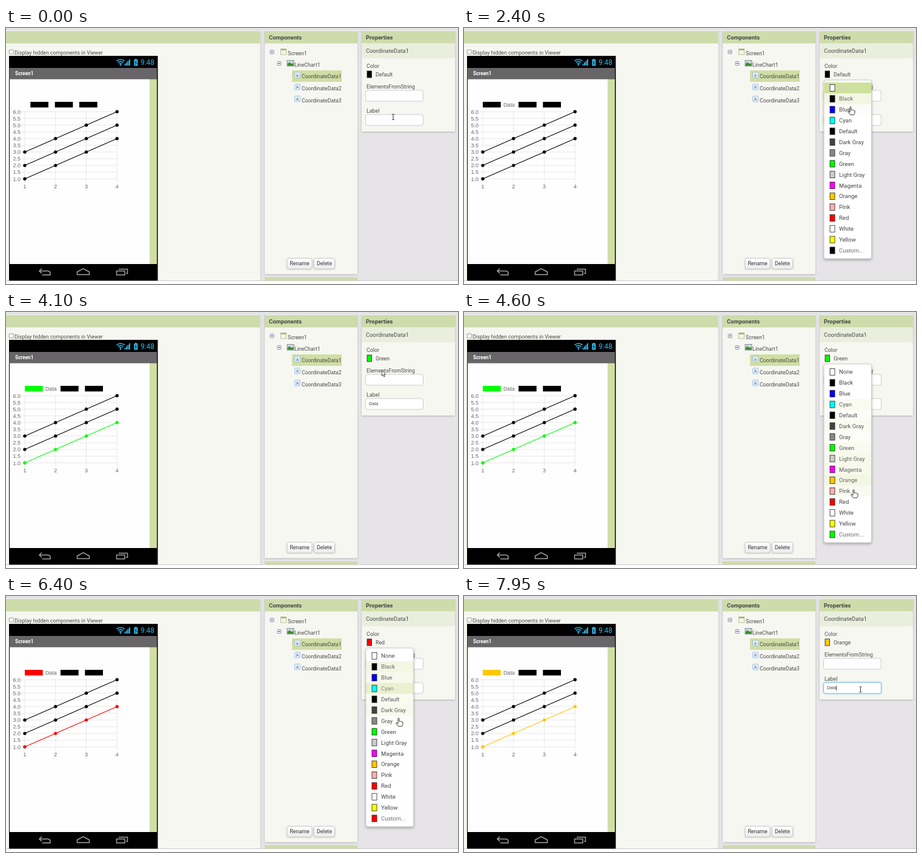
Write an HTML page that moves like this. It is 746 px wide and 423 px high and loops after 8 s.

```html
<!DOCTYPE html>
<html>
<head>
<meta charset="utf-8">
<style>
html, body { margin: 0; width: 100%; height: 100%; overflow: hidden; background: #fdfdfd; }
svg { display: block; width: 746px; height: 423px; font-family: Roboto, sans-serif; }
.chart { font-family: "Liberation Sans", Arial, sans-serif; }
</style>
</head>
<body>
<svg viewBox="0 0 746 423">
  <defs>
    <filter id="soft" x="-10%" y="-10%" width="120%" height="120%"><feDropShadow dx="0" dy="1" stdDeviation="1.5" flood-opacity=".22"/></filter>
    <filter id="lift" x="-10%" y="-5%" width="120%" height="110%"><feDropShadow dx="0" dy="2" stdDeviation="2" flood-opacity=".3"/></filter>
    <filter id="glow" x="-10%" y="-30%" width="120%" height="160%"><feDropShadow dx="0" dy="0" stdDeviation="1.8" flood-color="#52a8ec" flood-opacity=".7"/></filter>
    <linearGradient id="btn" x2="0" y2="1"><stop stop-color="#fff"/><stop offset="1" stop-color="#ececec"/></linearGradient>
  </defs>
  <g id="base"></g>
  <g id="live"></g>
</svg>
<script>
const LOOP = 8000, GREEN_BAR = '#cddcaa', PANEL = '#f6f7f1';
const rect = (x, y, w, h, fill, more = '') =>
  `<rect x="${x}" y="${y}" width="${w}" height="${h}" fill="${fill}" ${more}/>`;
const path = (d, stroke, width = 1, fill = 'none') =>
  `<path d="${d}" stroke="${stroke}" stroke-width="${width}" fill="${fill}"/>`;
const text = (x, mid, s, size = 8.75, fill = '#4a4a4a', more = '') =>
  `<text x="${x}" y="${mid + size * .36}" font-size="${size}" fill="${fill}" ${more}>${s}</text>`;
const bold = 'font-weight="700"';
const mix = (a, b, k) => `rgb(${a.map((v, i) => Math.round(v + (b[i] - v) * k))})`;

// Chart geometry
const px = v => 31 + (v - 1) * 50.75;
const py = v => 249.3 - (v - 1) * 22.2;
const series = (first, color) => {
  let s = path(`M${px(1)} ${py(first)}L${px(4)} ${py(first + 3)}`, color, 1.1);
  for (let i = 0; i < 4; i++) s += `<circle cx="${px(1 + i)}" cy="${py(first + i)}" r="2.7" fill="${color}"/>`;
  return s;
};

function input(y, value, focus) {
  return rect(593.5, y, 95, 18, '#fff', `rx="3" stroke="${focus ? '#7cbdee' : '#ccc'}" ${focus ? 'filter="url(#glow)"' : ''}`) +
    text(599, y + 8.7, value, 7.2, '#444', 'class="chart"');
}

function button(x, w, label) {
  return rect(x, 380.5, w, 17.5, 'url(#btn)', 'rx="3" stroke="#ccc" filter="url(#soft)"') +
    text(x + w / 2, 389, label, 8.8, '#333', 'text-anchor="middle"');
}

function phone() {
  let s = rect(5, 46, 245.5, 371.5, '#000') + rect(5.5, 66, 243.5, 18.5, '#676567') +
    rect(6, 84.5, 231, 305.5, '#fefefe') + rect(237, 84.5, 12, 305.5, '#d0dea5') +
    text(15, 75.3, 'Screen1', 8.2, '#fff', bold) + text(222, 57, '9:48', 11.9, '#33b5e5');
  s += path('M182.5 54.5Q189 49.5 195.5 54.5M184.8 57Q189 53.6 193.200 57M187 59.300Q189 57.800 191 59.300', '#33b5e5', 1.7);
  s += '<circle cx="189" cy="61.2" r="1.2" fill="#33b5e5"/>';
  for (let i = 0; i < 4; i++) s += rect(195.5 + i * 2.5, 59.5 - i * 2.6, 1.9, 2.5 + i * 2.6, '#33b5e5');
  s += rect(211.3, 52, 6, 10.5, '#33b5e5') + rect(213, 51, 2.6, 1.5, '#33b5e5') +
    path('M215 53.500L213 57.500H215.500L213.500 61', '#000', .8);
  s += path('M59 397.500L55 401.500L59 405.500M55 401.500H69Q73 402 73 405V408H60', '#a2a2a2', 1.5);
  s += path('M117.500 403L127.500 397.500L137.500 403V407.500H117.500Z', '#a2a2a2', 1.5);
  s += path('M182.500 401.500H196V408H182.500ZM186 398.500H200.500V405.500H198', '#a2a2a2', 1.5);
  return s;
}

function chartBase() {
  let s = '';
  for (let v = 1; v <= 6; v += .5) {
    s += path(`M26 ${py(v)}H${px(4)}`, '#e3e3e3', .8) +
      text(24, py(v), v.toFixed(1), 9, '#666', 'text-anchor="end" class="chart"');
  }
  for (let v = 1; v <= 4; v++) {
    s += path(`M${px(v)} ${py(6)}V254.500`, '#e3e3e3', .8) +
      text(px(v), 261.3, v, 9, '#666', 'text-anchor="middle" class="chart"');
  }
  return s + series(3, '#000') + series(2, '#000');
}

function tree() {
  let s = rect(472, 70, 82, 19, '#d0dea5');
  for (const [x, y] of [[436, 36.5], [448, 55.5]])
    s += rect(x, y, 6, 6, '#fff', 'rx="1" stroke="#8585b5"') + path(`M${x + 1.3} ${y + 3}h3.400`, '#333');
  s += rect(453.5, 34.5, 9, 9.5, '#f4f6e4', 'stroke="#a9b08b" stroke-width=".8"') + rect(453.5, 34.5, 9, 2.5, '#a9bd70');
  s += rect(464, 53.5, 11, 9.5, '#c5dcec', 'stroke="#666" stroke-width=".7"') +
    path('M464.500 62.500V59L468 56.500L471 59L474.500 58V62.500Z', 'none', 0, '#3d8d31') + '<circle cx="472" cy="56" r="1.1" fill="#f2d647"/>';
  s += text(465, 41.5, 'Screen1') + text(476, 60.8, 'LineChart1');
  for (let i = 0; i < 3; i++) {
    const y = 73 + i * 19.7;
    s += rect(476.5, y, 9, 9.5, '#e3eefb', 'rx="1" stroke="#9db7d6" stroke-width=".8"') +
      text(481, y + 4.9, 'A', 7.5, '#4674b8', 'text-anchor="middle"') +
      text(488, y + 7.3, 'CoordinateData' + (i + 1));
  }
  return s;
}

const panel = (x, y, w, h) => rect(x, y, w, h, PANEL, 'filter="url(#soft)"');

document.getElementById('base').innerHTML =
  rect(0, 0, 746, 418, '#e6e4e7') +
  panel(-5, 4, 424.500, 413.5) + rect(0, 5, 419.5, 20.5, GREEN_BAR) +
  panel(427, 4, 153, 402.5) + rect(427, 5, 153, 20.5, GREEN_BAR) +
  panel(587, 4, 154, 167) + rect(587, 5, 154, 20.5, GREEN_BAR) + rect(587, 25.5, 154, 24.5, '#eaeedd') +
  rect(427, 412, 153, 5.5, GREEN_BAR) +
  rect(0, 418, 746, 5, '#fdfdfd') + rect(0, 417, 746, 1, '#cbcbcb') +
  text(434, 15.3, 'Components', 9.45, '#444', bold) + text(594, 15.3, 'Properties', 9.45, '#444', bold) +
  text(594, 38, 'CoordinateData1', 9.45) +
  text(595, 63, 'Color', 8.8) + text(595, 97, 'ElementsFromString', 8.8) + text(595, 137, 'Label', 8.8) +
  rect(5.3, 36, 7, 7, '#fff', 'rx="1" stroke="#8a8a8a" stroke-width=".9"') +
  text(14, 41.3, 'Display hidden components in Viewer', 8.78) +
  button(464, 41, 'Rename') + button(508.5, 34, 'Delete') +
  phone() + chartBase() + tree();

const COLORS = {
  None: '#fff', Black: '#000', Blue: '#00f', Cyan: '#0ff', Default: '#000', 'Dark Gray': '#444', Gray: '#888',
  Green: '#0f0', 'Light Gray': '#ccc', Magenta: '#f0f', Orange: '#ffc800', Pink: '#ffafaf', Red: '#f00',
  White: '#fff', Yellow: '#ff0', 'Custom...': ''
};
const names = Object.keys(COLORS), ROW = 17.9, TOP = 90;

// Colour picks: start time, name, rgb
const PICKS = [[-2000, 'Default', [0, 0, 0]], [3050, 'Green', [0, 255, 0]], [5050, 'Red', [255, 0, 0]], [7050, 'Orange', [255, 200, 0]]];
const MENUS = [[2050, 3050], [4300, 5050], [6150, 7050]];
const TYPED = [450, 550, 700, 800];

// Pointer track: time, x, y
const TRACK = [
  [0, 639, 147], [200, 639, 147], [350, 642, 151], [1600, 642, 146], [1750, 630, 90], [1900, 622, 80], [2100, 622, 79],
  [2200, 628, 96], [2350, 634, 103], [2400, 638, 130], [2560, 644, 215], [2700, 648, 246], [2850, 646, 227], [3050, 646, 227],
  [3300, 654, 227], [3600, 653, 226], [3850, 642, 190], [4150, 616, 78], [4300, 616, 78], [4380, 624, 110], [4480, 637, 230],
  [4550, 642, 273], [4600, 643, 294], [4800, 642, 312], [5050, 641, 312], [5250, 638, 302], [5450, 636, 296], [5850, 614, 84],
  [6000, 611, 79], [6150, 611, 79], [6280, 630, 145], [6340, 638, 158], [6400, 648, 202], [6700, 648, 277], [7050, 648, 277],
  [7300, 664, 258], [7600, 672, 228], [7800, 670, 203], [7880, 655, 155], [8000, 654, 154]
];
function pointer(t) {
  const i = Math.max(1, TRACK.findIndex(p => p[0] > t));
  const [a, b] = [TRACK[i - 1], TRACK[i]], k = (t - a[0]) / (b[0] - a[0]);
  return [a[1] + (b[1] - a[1]) * k, a[2] + (b[2] - a[2]) * k];
}
const menuAt = t => MENUS.some(([from, to]) => t >= from && t < to);
const rowAt = t => menuAt(t) ? Math.floor((pointer(t)[1] - TOP) / ROW) : -1;

function menu(t, current) {
  // Hover fades linearly: the share of the last 200 ms spent on a row
  const heat = names.map(() => 0);
  for (let d = 0; d < 200; d += 10) {
    const r = rowAt(Math.max(0, t - d));
    if (r >= 0 && r < heat.length) heat[r] += .05;
  }
  let s = rect(594, 86, 78.5, 295, '#fff', 'rx="3" stroke="#c4c4c4" stroke-width=".8" filter="url(#lift)"');
  names.forEach((name, i) => {
    const y = TOP + i * ROW, mid = y + 9;
    if (heat[i] > 0) s += rect(594.5, y, 77.5, ROW, '#bfd778', `opacity="${heat[i]}"`);
    s += rect(604, mid - 5.5, 8, 11, COLORS[name] || current, 'stroke="#222" stroke-width=".8"') +
      text(619, mid, name, 9.5, mix(i == 15 ? [110, 110, 110] : [70, 70, 70], [255, 255, 255], heat[i]));
  });
  return s;
}

function cursor(t) {
  const [x, y] = pointer(t), open = menuAt(t);
  const inField = x > 593 && x < 689 && (y > 142 && y < 162 || y > 102 && y < 122);
  const overButton = x > 594 && x < 640 && y > 70 && y < 84;
  let s;
  if (open || overButton)
    s = path('M-1 1Q-1 -.500 0 -.500Q1 -.500 1 1V5L2.200 4.600L3.200 5.200L4.600 5L5.500 5.800L7 6V9.500L5.500 13H-.500L-4 8.500Q-4.500 7 -3.300 7L-1 8.800Z', '#222', .9, '#fff');
  else if (inField)
    s = path('M-2 -4.500H-.600L0 -4L.600 -4.500H2M0 -4V4M-2 4.500H-.600L0 4L.600 4.500H2', '#333', 1);
  else
    s = path('M0 0V9.200L2 7.300L3.500 10.600L5 10L3.600 6.800H6.400Z', '#333', .9, '#fff');
  return `<g transform="translate(${x} ${y})">${s}</g>`;
}

function legend(t, color) {
  const named = t >= 1100;
  const xs = named ? [31, 90, 130.3] : [40.3, 80.7, 121];
  return xs.map((x, i) => rect(x, 122, 29.7, 9.3, i ? '#000' : color)).join('') +
    (named ? text(65, 126.5, 'Data', 8.8, '#666', 'class="chart"') : '');
}

const live = document.getElementById('live');
function draw(t) {
  const n = PICKS.findLastIndex(p => t >= p[0]);
  const [since, name, rgb] = PICKS[n], prev = PICKS[Math.max(0, n - 1)][2];
  const ease = 1 - (1 - Math.min(1, (t - since) / 900)) ** 4;
  const color = COLORS[name];
  const typed = 'Data'.slice(0, TYPED.filter(at => t >= at).length);
  const focus = t >= 350 && t < 1050 || t >= 7880;
  live.innerHTML =
    legend(t, color) + series(1, mix(prev, rgb, ease)) +
    rect(596, 71, 7.5, 11, color, 'stroke="#222" stroke-width=".8"') + text(610, 76.5, name, 8.8) +
    input(103, '') + input(143, typed, focus) +
    (focus ? rect(599 + [0, 5.2, 9.2, 11.2, 15.2][typed.length], 147.5, .8, 9, '#333') : '') +
    (menuAt(t) ? menu(t, color) : '') + cursor(t);
}

const start = performance.now();
function tick() {
  draw((performance.now() - start) % LOOP);
  requestAnimationFrame(tick);
}
tick();
</script>
</body>
</html>
```
